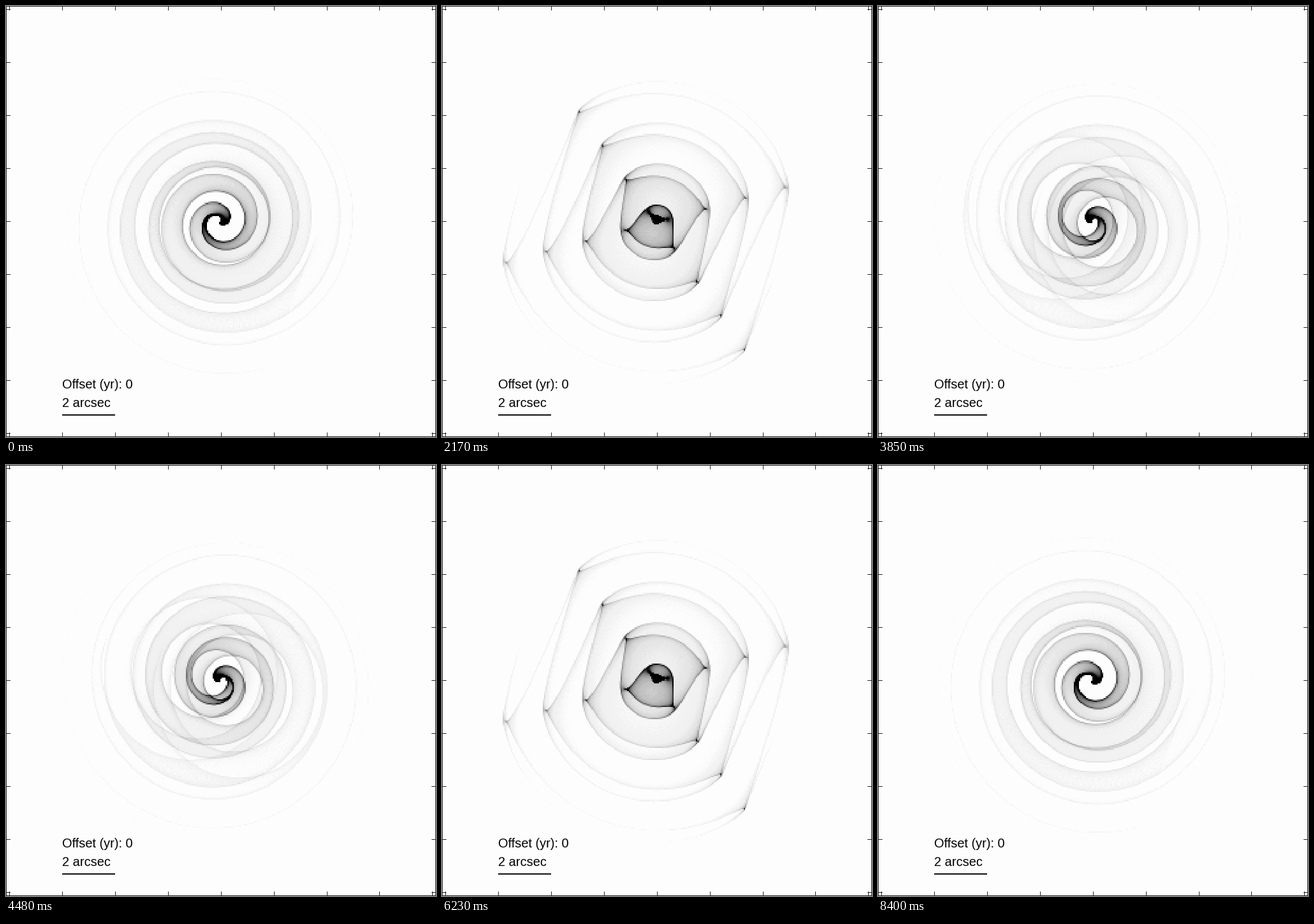
Animation, 674 px wide and 675 px high, one loop 8470 ms. Source, as a matplotlib script:

```python
import numpy as np
import matplotlib.pyplot as plt
from matplotlib.animation import FuncAnimation
from matplotlib.collections import LineCollection

W, H, DPI = 674, 675, 100
FRAMES, INTERVAL = 121, 70
PX = 72 / DPI                       # one pixel in points

# Dust plume: a hollow cone swept round by a circular binary
PITCH, TURNS = 65.0, 4              # pixels per orbit, orbits shown
CONE = np.radians(55)               # half opening angle
PHASE = np.radians(-19.5)           # cone axis at zero age
NODE = np.radians(70)               # line of nodes on the sky
DENSITY = 200                       # grey levels emitted per pixel of radius
BG, STEP = 253, 12                  # background grey, grey per level

BIN, NBIN = 2.075, 325
STAR = (161.5, 163.5)               # in bins

RINGS, POINTS = 7000, 200
R_MAX = PITCH * TURNS
WEIGHT = DENSITY * R_MAX / (RINGS * POINTS)


def build_plume():
    """Plume points in bins: along the node, across it, and in depth."""
    j = np.arange(RINGS)[:, None]
    r = R_MAX * (j + 0.5) / RINGS / BIN
    theta = PHASE - NODE + 2 * np.pi * TURNS * (j + 0.5) / RINGS
    phi = 2 * np.pi * (np.arange(POINTS) / POINTS + j * 0.6180339887 % 1)
    along, side = r * np.cos(CONE), r * np.sin(CONE) * np.cos(phi)
    u = along * np.cos(theta) - side * np.sin(theta)
    v = along * np.sin(theta) + side * np.cos(theta)
    z = r * np.sin(CONE) * np.sin(phi)
    return [a.ravel().astype(np.float32) for a in (u, v, z)]


U, V, Z = build_plume()
COS_N, SIN_N = np.float32(np.cos(NODE)), np.float32(np.sin(NODE))
X0 = STAR[0] + U * COS_N
Y0 = STAR[1] - U * SIN_N


def whole_levels(level):
    """Soft floor: partly filled levels mostly drop to the one below."""
    level = level - 0.5
    return np.maximum(level - np.sin(2 * np.pi * level) / (2 * np.pi), 0)


cache = {}


def render(k):
    if k not in cache:
        inc = np.radians(3 * k)
        b = V * np.float32(np.cos(inc)) + Z * np.float32(np.sin(inc))
        col = (X0 - b * SIN_N).astype(np.int32)
        row = (Y0 - b * COS_N).astype(np.int32)
        count = np.bincount(row * NBIN + col, minlength=NBIN * NBIN)
        level = whole_levels(count.reshape(NBIN, NBIN) * WEIGHT)
        cache[k] = np.clip(BG - STEP * level, 0, 255)
    return cache[k]


fig = plt.figure(figsize=(W / DPI, H / DPI), dpi=DPI, facecolor=(BG / 255,) * 3)
ax = fig.add_axes([0, 0, 1, 1])
ax.axis("off")
image = ax.imshow(render(0), cmap="gray", vmin=0, vmax=255, aspect="auto",
                  interpolation="nearest",
                  extent=(0, NBIN * BIN, NBIN * BIN, 0))
ax.set_xlim(0, W)
ax.set_ylim(H, 0)

# Box and ticks every two arcseconds
lines = [[(0.5, 0), (0.5, H)], [(W - 0.5, 0), (W - 0.5, H)],
         [(0, 0.5), (W, 0.5)], [(0, H - 0.5), (W, H - 0.5)]]
for n in range(-4, 5):
    x = np.floor(337.2 + 82.9 * n) + 0.5
    y = np.floor(337.5 + 83 * n) + 0.5
    lines += [[(x, 0), (x, 7)], [(x, H - 7), (x, H)],
              [(0, y), (7, y)], [(W - 7, y), (W, y)]]
ticks = LineCollection(lines, colors="#262626", linewidths=PX,
                       capstyle="butt")
ticks.set_snap(False)
ax.add_collection(ticks)

ax.plot([88, 171], [640.5, 640.5], color="black", lw=2 * PX,
        solid_capstyle="butt", snap=False)
for text, y in (("Offset (yr): 0", 599), ("2 arcsec", 628)):
    ax.text(88, y, text, family="Liberation Sans", size=20 * PX,
            color="black", va="baseline")


def update(n):
    # Inclinations i and 360 - i project alike
    image.set_data(render(min(n, FRAMES - 1 - n)))
    return (image,)


anim = FuncAnimation(fig, update, frames=FRAMES, interval=INTERVAL,
                     repeat=True, repeat_delay=0)
plt.show()
```
